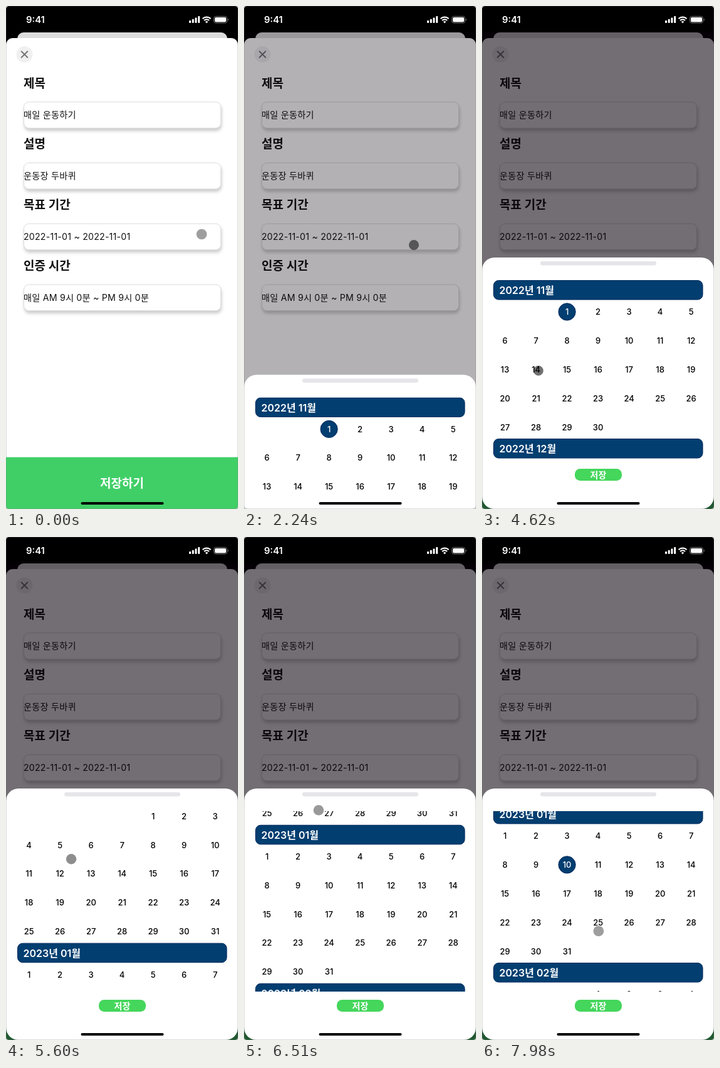
These frames come from a looping animation (370x800 px, 8000 ms). An HTML page:

```html
<!DOCTYPE html>
<html lang="ko">
<head>
<meta charset="utf-8">
<title>목표 기간 선택</title>
<style>
  html, body { margin: 0; width: 100%; height: 100%; overflow: hidden; background: #ccc; }
  svg { display: block; width: 100%; height: 100%; border-radius: 5px; }
  text { font-family: Inter, "Noto Sans CJK KR", "Noto Sans CJK", sans-serif; }
  .title { font-size: 19px; font-weight: 600; fill: #111; }
  .value { font-size: 14.2px; letter-spacing: .2px; fill: #111; }
  .month { font-size: 16px; font-weight: 600; fill: #fff; }
  .day { font-size: 13px; font-weight: 500; text-anchor: middle; }
  .navy { fill: #023e70; stroke: #002a5e; }
  .button { font-weight: 600; fill: #fff; text-anchor: middle; }
  .field { fill: #fff; stroke: #dcdcdf; filter: drop-shadow(1px 4px 2.5px rgba(0, 0, 0, .2)); }
</style>
</head>
<body>
<svg viewBox="0 0 370 800">
  <clipPath id="listClip"><rect y="436" width="370" height="287"/></clipPath>
  <rect width="370" height="800"/>
  <rect x="18" y="42" width="335" height="40" rx="10" fill="#dcdcdc"/>
  <rect y="51" width="370" height="780" rx="11" fill="#fff"/>
  <circle cx="29.5" cy="77" r="13" fill="#f0f0f1"/>
  <path d="M24.7 72.2l9.6 9.6m0-9.6l-9.6 9.6" stroke="#747478" stroke-width="2" stroke-linecap="round"/>
  <g id="form"></g>
  <rect y="717.6" width="370" height="83" fill="#40cf67"/>
  <text class="button" x="185" y="766" font-size="19">저장하기</text>

  <rect id="dim" y="42" width="370" height="758" fill="#08000a"/>

  <g id="status" fill="#fff">
    <text x="32" y="27" font-size="14.8" font-weight="600">9:41</text>
    <g fill="none" stroke="#fff" stroke-width="2.1">
      <path d="M313.5 20.2a9.4 9.4 0 0 1 13 0"/>
      <path d="M316 23a5.8 5.8 0 0 1 8 0"/>
    </g>
    <path d="M320 27.5l-2.2-2.4a3.2 3.2 0 0 1 4.4 0z"/>
    <rect x="331.5" y="16.5" width="21" height="10.5" rx="3" fill="none" stroke="#777"/>
    <rect x="333" y="18" width="18" height="7.5" rx="1.8"/>
    <path d="M354 20v3.6a2 2 0 0 0 0-3.6z" fill="#777"/>
  </g>

  <g id="sheet">
    <rect y="400" width="370" height="400" rx="20" fill="#fff"/>
    <rect x="93" y="406" width="185" height="6.5" rx="3.2" fill="#e6e6ea"/>
    <g clip-path="url(#listClip)"><g id="list"></g></g>
    <rect x="148" y="736" width="75" height="19" rx="8.5" fill="#45d65c"/>
    <text class="button" x="185.5" y="750.5" font-size="14">저장</text>
  </g>
  <rect x="119.5" y="789" width="132" height="4" rx="2"/>
  <circle id="touch"/>
  <rect width="370" height="800" rx="5" fill="none" stroke="#777" stroke-opacity=".5"/>
</svg>
<script>
const LOOP = 8000, STEP = 70;
const MONTH_HEIGHT = 252, COLUMN = 49.5, ROW = 45.9;
const $ = id => document.getElementById(id);

function set(el, attrs) {
  for (const key in attrs) el.setAttribute(key, attrs[key]);
  return el;
}

function add(parent, tag, attrs, text = "") {
  const el = set(document.createElementNS("http://www.w3.org/2000/svg", tag), attrs);
  el.textContent = text;
  return parent.appendChild(el);
}

// Signal bars
for (let i = 0; i < 4; i++) {
  const height = 4 + 2.3 * i;
  add($("status"), "rect", { x: 292 + 4.7 * i, y: 27 - height, width: 3, height, rx: 1 });
}

// Form rows
[
  ["제목", "매일 운동하기"],
  ["설명", "운동장 두바퀴"],
  ["목표 기간", "2022-11-01 ~ 2022-11-01"],
  ["인증 시간", "매일 AM 9시 0분 ~ PM 9시 0분"]
].forEach(([title, value], i) => {
  const row = add($("form"), "g", { transform: `translate(28 ${152.7 + 96.8 * i})` });
  add(row, "text", { class: "title", y: -23.2 }, title);
  add(row, "rect", { class: "field", x: .5, width: 314, height: 41.5, rx: 8 });
  add(row, "text", { class: "value", y: 25.8 }, value);
});

// Calendar: four months from November 2022
function addMonth(index) {
  const first = new Date(2022, 10 + index, 1);
  const count = new Date(2022, 11 + index, 0).getDate();
  const month = String(first.getMonth() + 1).padStart(2, "0");
  const group = add($("list"), "g", { transform: `translate(0 ${436 + MONTH_HEIGHT * index})` });
  add(group, "rect", { class: "navy", x: 18.5, y: .5, width: 333.5, height: 30.5, rx: 8 });
  add(group, "text", { class: "month", x: 27.5, y: 22 }, `${first.getFullYear()}년 ${month}월`);

  return Array.from({ length: count }, (_, i) => {
    const cell = first.getDay() + i;
    const x = 36.6 + COLUMN * (cell % 7), y = 50.4 + ROW * Math.floor(cell / 7);
    const dot = add(group, "circle", { class: "navy", cx: x, cy: y, r: 13.6 });
    const text = add(group, "text", { class: "day", x, y: y + 4.6 }, i + 1);
    return on => {
      dot.setAttribute("visibility", on ? "visible" : "hidden");
      text.setAttribute("fill", on ? "#fff" : "#000");
    };
  });
}

const months = [0, 1, 2, 3].map(addMonth);
months.flat().forEach(select => select(false));

const clamp = v => Math.max(0, Math.min(1, v));
const phase = (t, from, to) => clamp((t - from) / (to - from));
const smooth = p => p * p * (3 - 2 * p);
const easeOut = p => 1 - (1 - p) ** 3;

const swipes = [
  { at: 4690, distance: 295, glide: 1050 },
  { at: 6200, distance: 220, glide: 660 }
];

// Where the finger pauses; a higher opacity means a press
const stops = [
  { at: 0, x: 312, y: 363, opacity: .38 },
  { at: 2030, x: 279.5, y: 369, opacity: .55 },
  { at: 3080, x: 197, y: 476, opacity: .24 },
  { at: 4620, x: 90, y: 580, opacity: .56 },
  { at: 6090, x: 109, y: 549, opacity: .4 },
  { at: 6930, x: 129, y: 539, opacity: .4 },
  { at: 7280, x: 136, y: 522, opacity: .56 },
  { at: LOOP, x: 186, y: 627, opacity: .38 }
];

function drawTouch(t) {
  const i = stops.findIndex(stop => stop.at > t);
  const a = stops[i - 1], b = stops[i];
  const p = smooth(phase(t, a.at, b.at));
  const mix = key => a[key] + (b[key] - a[key]) * p;
  const lift = swipes.reduce((sum, s) => sum + 110 * Math.sin(Math.PI * phase(t, s.at, s.at + s.glide)), 0);
  const opacity = mix("opacity");
  set($("touch"), { cx: mix("x"), cy: mix("y") - lift, r: 9.3 - 2.5 * opacity, opacity });
}

function draw(t) {
  const open = easeOut(phase(t, 2130, 2620));
  set($("dim"), { opacity: .57 * open });
  set($("sheet"), { transform: `translate(0 ${400 * (1 - open)})` });

  const scroll = swipes.reduce((sum, s) => sum + s.distance * easeOut(phase(t, s.at, s.at + s.glide)), 0);
  set($("list"), { transform: `translate(0 ${-scroll})` });

  const picked = t >= 7350;
  months[0][0](!picked);
  months[2][9](picked);
  drawTouch(t);
}

const start = performance.now();
function tick() {
  const t = (performance.now() - start) % LOOP;
  draw(Math.floor(t / STEP) * STEP);
  requestAnimationFrame(tick);
}
tick();
</script>
</body>
</html>
```
